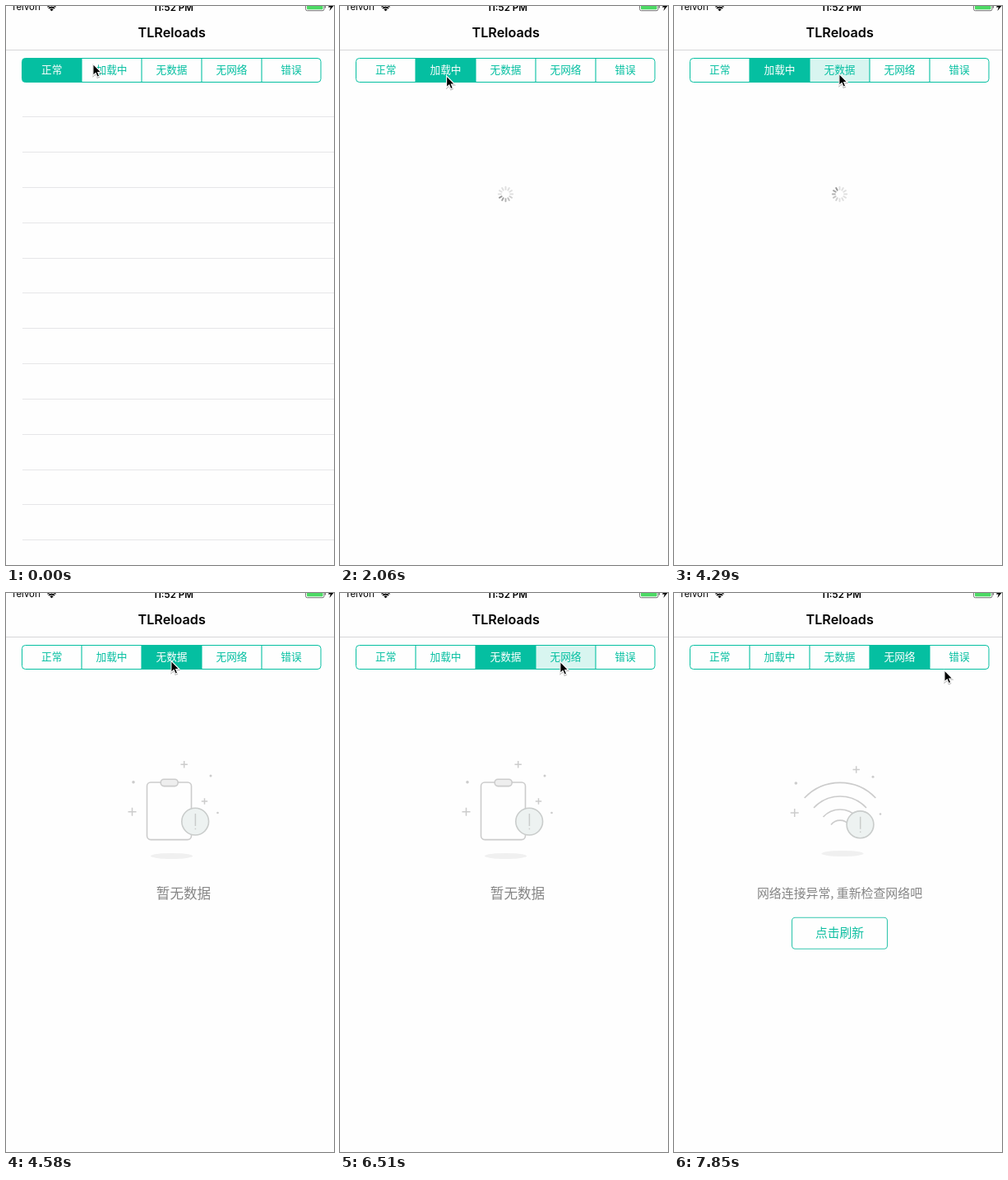
An HTML page for the animation above (8000 ms loop, 399 px wide and 679 px high).

```html
<!DOCTYPE html>
<html lang="zh-CN">
<head>
<meta charset="utf-8">
<style>
html, body { margin: 0; height: 100%; overflow: hidden; background: #fefefe; }
svg { display: block; width: 399px; height: 679px; }
text { font-family: Inter, "Noto Sans CJK SC", "Noto Sans CJK", sans-serif; text-anchor: middle; }
.cjk { font-family: "Noto Sans CJK SC", "Noto Sans CJK", sans-serif; }
</style>
</head>
<body>
<svg viewBox="0 0 399 679">
  <defs><clipPath id="pill"><rect x="19.5" y="63.5" width="363.5" height="29" rx="4"/></clipPath></defs>

  <g id="status">
    <text x="6" y="5.3" font-size="11.4" style="text-anchor:start">Telvori</text>
    <path d="M50 1Q55.5-4 61 1L55.5 6.2Z"/>
    <path d="M50.5 2.1Q55.5-1.6 60.5 2.1M52.3 4Q55.5 1.6 58.7 4" fill="none" stroke="#fefefe" stroke-width=".9"/>
    <text x="203.5" y="5.5" font-size="11.6" font-weight="600">11:52 PM</text>
    <rect x="364.5" y="-4" width="22.5" height="9.7" rx="2" fill="none" stroke="#777"/>
    <rect x="366" y="-4" width="19.5" height="8.2" rx="1" fill="#4cd964"/>
    <path d="M388.4-1v3.5" stroke="#777" stroke-width="1.4"/>
    <path d="M396-4L391.8 1.4H394.8L393.4 6L398.4 0H395.3Z"/>
  </g>
  <text x="201.7" y="38" font-size="16.2" font-weight="600">TLReloads</text>
  <rect y="53" width="399" height="1" fill="#d6d6d8"/>

  <g id="table" fill="#e6e6e8"></g>
  <g id="spinner" transform="translate(201.5 228.5)" stroke="#8c8c8c" stroke-width="1.9" stroke-linecap="round"></g>
  <g id="empty">
    <g fill="none" stroke="#ccc" stroke-width="1.6">
      <rect x="171.5" y="230" width="54" height="69.6" rx="4.5" fill="#fefefe"/>
      <rect x="188.2" y="226.2" width="21" height="8.4" rx="4" fill="#eee"/>
    </g>
    <text class="cjk" x="216" y="370.6" font-size="16.6" fill="#858585">暂无数据</text>
  </g>
  <g id="offline">
    <text class="cjk" x="201.5" y="370" font-size="14.9" fill="#858585">网络连接异常, 重新检查网络吧</text>
    <rect x="143.5" y="394.3" width="116" height="38" rx="4" fill="none" stroke="#35c6ae" stroke-width="1.1"/>
    <text class="cjk" x="201.5" y="418.4" font-size="14.8" fill="#10bfa2">点击刷新</text>
  </g>

  <g id="tabs"></g>
  <path id="cursor" d="M.6.8V15L3.8 12L5.8 16.7L8.3 15.6L6.4 11H10.6Z" stroke="#fff" stroke-width="1.1"
    style="filter:drop-shadow(0 1px .7px #0005)"/>
</svg>
<script>
const TEAL = '#05bfa1', LOOP = 8000, TICK = 147.9;
const $ = id => document.getElementById(id);
const add = (id, markup) => $(id).insertAdjacentHTML('beforeend', markup);
const range = n => [...Array(n).keys()];

const plus = (x, y, r) => `<path d="M${x - r} ${y}h${2 * r}M${x} ${y - r}v${2 * r}" stroke="#ccc" stroke-width="1.5"/>`;
const dot = (x, y, r) => `<circle cx="${x}" cy="${y}" r="${r}" fill="#ccc"/>`;
const shadow = (x, y) => `<ellipse cx="${x}" cy="${y}" rx="25.7" ry="3.4" fill="#f0f0f0"/>`;
const badge = (x, y) => `<g transform="translate(${x} ${y})" stroke="#c9cccb">
  <circle r="16.4" fill="#edf2f1" stroke-width="1.6"/>
  <path d="M.2-9.5V5.5M.2 8.2v1.4" stroke-width="1.5"/></g>`;
const arc = (r, half, bottom) =>
  `<path d="M${202 - half} ${bottom}A${r} ${r} 0 0 1 ${202 + half} ${bottom}" fill="none" stroke="#ccc" stroke-width="1.7"/>`;

add('table', range(13).map(i =>
  `<rect x="20" y="${Math.floor(134.7 + 42.84 * i)}" width="379" height="1"/>`).join(''));
add('spinner', range(12).map(i => `<path d="M0-5.6V-8.7" transform="rotate(${i * 30})"/>`).join(''));
add('empty', badge(230.2, 277.6) + shadow(201.5, 319.5)
  + plus(216.7, 208.3, 4.2) + plus(153.5, 265.7, 5) + plus(241.5, 253, 3.7)
  + dot(155, 229.7, 1.8) + dot(249, 222, 1.5) + dot(257.5, 267, 1.3));
add('offline', arc(59.7, 43.3, 249) + arc(43.6, 32, 261) + arc(27.8, 20.5, 272) + arc(14, 11, 281.5)
  + badge(226.5, 281.3) + shadow(205, 316.5)
  + plus(221.7, 214.5, 4.2) + plus(146.7, 267, 5)
  + dot(148.3, 231, 1.8) + dot(242, 223.3, 1.5) + dot(251, 268.5, 1.3));

const edges = [19.5, 92, 165, 238, 311, 383];
const labels = ['正常', '加载中', '无数据', '无网络', '错误'];
add('tabs', `<g clip-path="url(#pill)">${labels.map((_, i) =>
    `<rect class="fill" x="${edges[i]}" y="63" width="${edges[i + 1] - edges[i]}" height="30" fill="${TEAL}"/>`).join('')}</g>
  <rect x="19.5" y="63.5" width="363.5" height="29" rx="4" fill="none" stroke="${TEAL}"/>
  <path d="${edges.slice(1, 5).map(x => `M${x} 64v29`).join('')}" stroke="${TEAL}" stroke-width="1.1"/>`
  + labels.map((label, i) =>
    `<text class="label cjk" x="${(edges[i] + edges[i + 1]) / 2}" y="82" font-size="12.7">${label}</text>`).join(''));

const fills = document.querySelectorAll('.fill');
const texts = document.querySelectorAll('.label');
const spokes = $('spinner').children;

// Tick on which each tab is pressed; it becomes selected one tick later.
const presses = [[12, 1], [29, 2], [44, 3]];

// Pointer path: tick, x, y.
const path = [
  [1, 105.3, 69.5], [3, 124, 89], [5, 137.5, 98], [7, 129, 84],
  [19, 129, 84], [21, 155, 91], [23, 205, 90], [24, 212, 88], [26, 200.3, 81.5],
  [37, 200.3, 81.5], [38, 221, 90.5], [40, 261, 92], [41, 268.5, 88], [43, 267.3, 82.5],
  [51, 267.3, 82.5], [52, 294, 87], [53, 328.4, 93]
];

function pointer(tick) {
  const next = path.findIndex(p => p[0] >= tick);
  if (next < 1) return path[next < 0 ? path.length - 1 : 0].slice(1);
  const [a, b] = [path[next - 1], path[next]];
  const k = (tick - a[0]) / (b[0] - a[0]);
  return [a[1] + (b[1] - a[1]) * k, a[2] + (b[2] - a[2]) * k];
}

function tabWeights(tick) {
  const weights = [1, 0, 0, 0, 0];
  for (const [at, tab] of presses) {
    if (tick === at) weights[tab] = .15;
    if (tick > at) {
      const k = tick === at + 1 ? .6 : 1;
      weights[tab] = k;
      weights[tab - 1] = 1 - k;
    }
  }
  return weights;
}

function draw(time) {
  const tick = Math.min(53, Math.floor((time + 11) / TICK));
  const view = presses.filter(([at]) => tick > at).length;
  ['table', 'spinner', 'empty', 'offline'].forEach((id, i) => $(id).style.display = i === view ? '' : 'none');

  tabWeights(tick).forEach((w, i) => {
    fills[i].setAttribute('fill-opacity', w);
    const white = Math.max(0, (w - .15) / .85) * 100;
    texts[i].style.fill = `color-mix(in srgb, #fff ${white}%, ${TEAL})`;
  });

  const head = Math.floor(tick * TICK * .012 + 8);
  for (let i = 0; i < 12; i++) {
    const age = (head - i + 12) % 12;
    spokes[i].setAttribute('stroke-opacity', Math.max(.27, .92 - age * .13));
  }
  $('cursor').setAttribute('transform', `translate(${pointer(tick)})`);
}

function loop() {
  draw(performance.now() % LOOP);
  requestAnimationFrame(loop);
}
loop();
</script>
</body>
</html>
```
